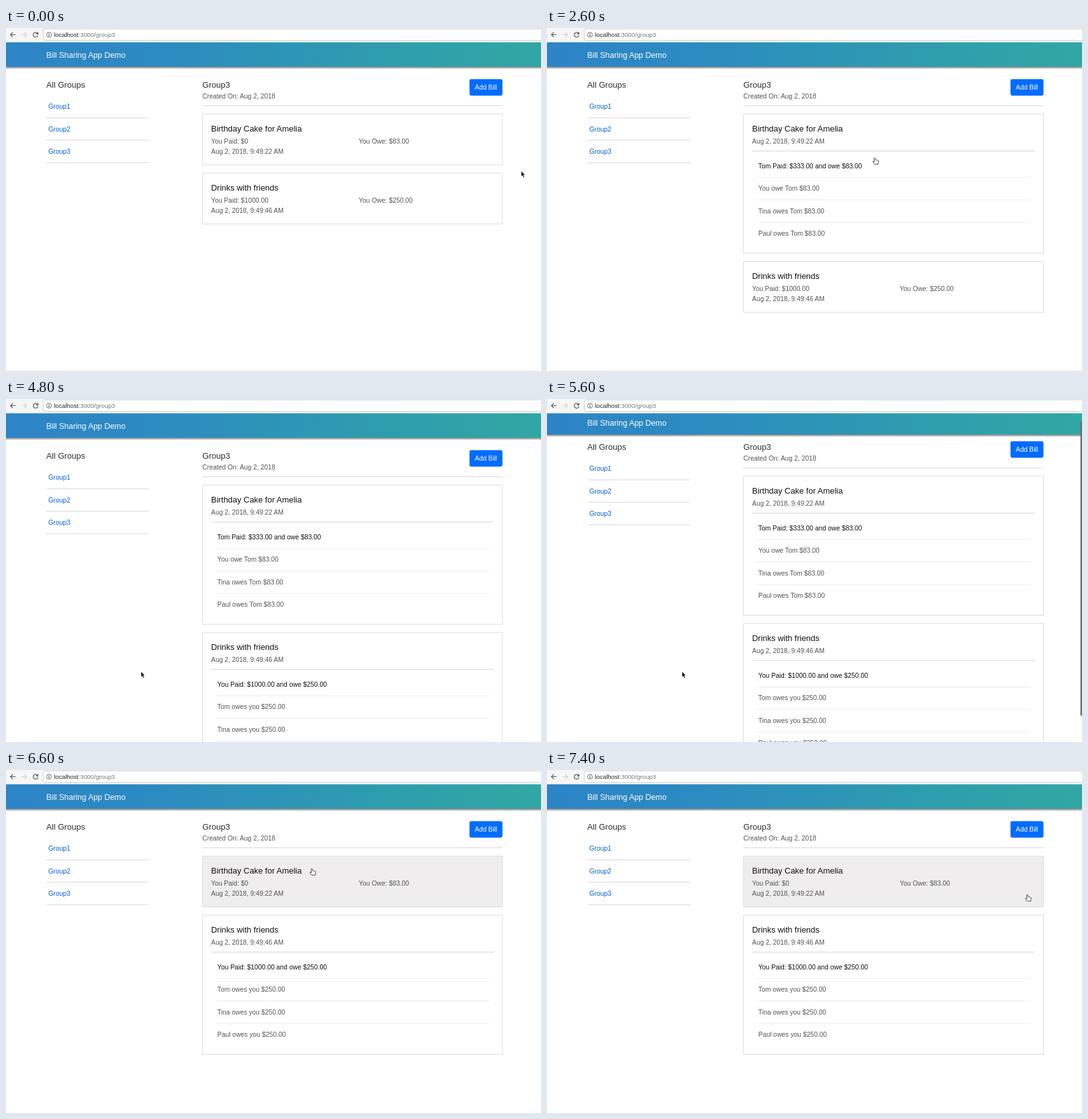
Animation, 840 px wide and 540 px high, one loop 7500 ms. Source, as an HTML page:

```html
<!DOCTYPE html>
<html lang="en">
<head>
<meta charset="utf-8">
<title>Bill Sharing App Demo</title>
<style>
  html, body { margin: 0; width: 100%; height: 100%; overflow: hidden; background: #fff; }
  svg { display: block; }
  text { font: 10.35px "Liberation Sans", Arial, sans-serif; fill: #50555a; white-space: pre; }
  .title { font-size: 12.95px; fill: #111; }
  .head { font-size: 13.05px; fill: #2a2d30; }
  .link { fill: #005fd6; }
  .strong { fill: #111; }
  .white { fill: #fff; }
  .brand { font-size: 12.43px; fill: #fff; }
  .url { font-size: 9.75px; fill: #777; }
  .url tspan { fill: #222; }
  .rule { stroke: #d4d5d6; }
  .thin { stroke: #ececec; }
  .icon { fill: none; stroke: #555; stroke-width: 1.2; }
</style>
</head>
<body>
<svg id="stage" width="840" height="540" viewBox="0 0 840 540">
  <defs>
    <linearGradient id="sea">
      <stop offset="0" stop-color="#2d84c7"/>
      <stop offset="0.25" stop-color="#2c8ac2"/>
      <stop offset="0.75" stop-color="#2e9fac"/>
      <stop offset="1" stop-color="#31a7a4"/>
    </linearGradient>
    <linearGradient id="shade" x2="0" y2="1">
      <stop offset="0" stop-opacity="0.5"/>
      <stop offset="1" stop-opacity="0"/>
    </linearGradient>
  </defs>
  <g id="page"></g>
  <g id="header">
    <rect y="61" width="840" height="4" fill="url(#shade)"/>
    <rect y="20" width="840" height="41" fill="url(#sea)"/>
    <text class="brand" x="63.3" y="46.5">Bill Sharing App Demo</text>
  </g>
  <rect id="thumb" x="837.5" width="3" height="464" rx="1.5" fill="#6b6f72"/>
  <g id="toolbar">
    <rect width="840" height="22.5" fill="#f6f6f6"/>
    <rect x="58.5" y="1.5" width="800" height="18" rx="2.5" fill="#fff" stroke="#d0d0d0"/>
    <path class="icon" d="M15 10.5H7M10.8 6.7 7 10.5l3.8 3.8"/>
    <path class="icon" style="stroke:#d2d2d2" d="M24.5 10.5h8M28.7 6.7l3.8 3.8-3.8 3.8"/>
    <path class="icon" d="M49.3 8.2A3.7 3.7 0 1 0 50.1 11.4"/>
    <path fill="#555" d="M50.6 6v4h-4z"/>
    <circle class="icon" style="stroke-width:.9" cx="67.5" cy="10.6" r="3.8"/>
    <path class="icon" d="M67.5 8.3v1.2M67.5 10.1v2.8"/>
    <text class="url" x="75.3" y="14"><tspan>localhost</tspan>:3000/group3</text>
  </g>
  <path id="arrow" fill="#000" stroke="#fff" stroke-width=".7"
    d="M0 0V9L2 7.2 3.5 10.5 5.1 9.8 3.6 6.6H6.2Z"/>
  <path id="hand" fill="#fff" stroke="#333" stroke-width=".9" stroke-linejoin="round"
    d="M-1 1Q0-.7 1 1L1.6 4Q2.6 3.2 3.4 4.2 4.3 3.6 5 4.7 6.2 4.4 6.2 6L5.6 8.4V10.4H-.2L-2.6 7.2Q-3.4 5.9-2 5.8L-.4 6.8Z"/>
</svg>
<script>
const LOOP = 7500, STEP = 100;
const byId = id => document.getElementById(id);

const text = (x, y, s, cls = "") => `<text class="${cls}" x="${x}" y="${y}">${s}</text>`;
const line = (x1, x2, y, cls) => `<path class="${cls}" d="M${x1} ${y}H${x2}"/>`;

const bills = [
  { name: "Birthday Cake for Amelia", paid: "$0", owe: "$83.00", date: "Aug 2, 2018, 9:49:22 AM",
    open: [1900, 6500],
    rows: ["Tom Paid: $333.00 and owe $83.00", "You owe Tom $83.00",
           "Tina owes Tom $83.00", "Paul owes Tom $83.00"] },
  { name: "Drinks with friends", paid: "$1000.00", owe: "$250.00", date: "Aug 2, 2018, 9:49:46 AM",
    open: [4400, LOOP],
    rows: ["You Paid: $1000.00 and owe $250.00", "Tom owes you $250.00",
           "Tina owes you $250.00", "Paul owes you $250.00"] }
];

// Each key is [time, ...values]
const pointerKeys = [
  [0, 809, 225], [900, 585, 172], [1600, 556, 177], [2400, 556, 177], [3200, 290, 350],
  [3800, 288, 397], [4000, 288, 397], [4300, 380, 410], [4500, 380, 410], [4800, 212, 429],
  [6000, 212, 429], [6500, 480, 155], [6700, 480, 155], [7400, 754, 196]
];
const scrollKeys = [[5500, 0], [5600, 14], [5800, 60], [6000, 60], [6300, 0]];
const headerKeys = [[5500, 0], [5600, 5], [5700, 0]];

function track(keys, t) {
  const i = keys.findIndex(k => k[0] > t);
  if (i === 0) return keys[0].slice(1);
  if (i < 0) return keys[keys.length - 1].slice(1);
  const a = keys[i - 1], b = keys[i];
  const u = (t - a[0]) / (b[0] - a[0]), e = u * u * (3 - 2 * u);
  return a.slice(1).map((v, j) => v + (b[j + 1] - v) * e);
}

function sidebar() {
  const links = [1, 2, 3].map((n, i) =>
    text(66.5, 127.2 + i * 35.4, "Group" + n, "link") + line(63.5, 224.5, 141.3 + i * 35.4, "rule"));
  return text(63.3, 94.2, "All Groups", "head") + links.join("");
}

function groupHead() {
  return text(308.3, 94.2, "Group3", "head") + text(308.3, 111, "Created On: Aug 2, 2018") +
    line(308, 779.5, 122.3, "rule") +
    `<rect x="727.7" y="80.6" width="51.8" height="25.8" rx="2.8" fill="#006cff"/>` +
    text(736, 97.2, "Add Bill", "white");
}

function card(bill, y, height, open, hover) {
  const fill = hover && !open ? "#efedee" : "#fff";
  let out = `<rect x="308.5" y="${y}" width="471" height="${height}" fill="${fill}" stroke="#dcdddd"/>` +
    text(322, y + 27, bill.name, "title");
  if (!open) {
    return out + text(322, y + 46.8, "You Paid: " + bill.paid) +
      text(553.8, y + 46.8, "You Owe: " + bill.owe) + text(322, y + 62.4, bill.date);
  }
  out += text(322, y + 46.8, bill.date) + line(322, 766, y + 58.2, "rule");
  bill.rows.forEach((row, i) => {
    out += text(331.8, y + 85.4 + i * 35.4, row, i ? "" : "strong");
    if (i) out += line(328.5, 759.5, y + 64.4 + i * 35.4, "thin");
  });
  return out;
}

let shown = -1;
function draw(t) {
  const [x, y] = track(pointerKeys, t);
  const [scroll] = track(scrollKeys, t);
  const [lift] = track(headerKeys, t);
  let top = 135.5, overCard = false, html = sidebar() + groupHead();

  for (const bill of bills) {
    const open = t >= bill.open[0] && t < bill.open[1];
    const height = open ? 219 : 80, py = y + scroll;
    const hover = x > 308 && x < 780 && py > top && py < top + height;
    overCard = overCard || hover;
    html += card(bill, top, height, open, hover);
    top += height + 13;
  }

  byId("page").innerHTML = html;
  byId("page").setAttribute("transform", `translate(0 ${-scroll})`);
  byId("header").setAttribute("transform", `translate(0 ${-lift})`);
  byId("thumb").setAttribute("y", 22 + scroll * 518 / 578);
  byId("thumb").style.display = scroll > 0 ? "" : "none";
  for (const id of ["arrow", "hand"]) {
    byId(id).setAttribute("transform", `translate(${x} ${y})`);
    byId(id).style.display = (id === "hand") === overCard ? "" : "none";
  }
}

const start = performance.now();
function tick() {
  const t = Math.floor((performance.now() - start) % LOOP / STEP) * STEP;
  if (t !== shown) draw(shown = t);
  requestAnimationFrame(tick);
}
tick();
</script>
</body>
</html>
```
